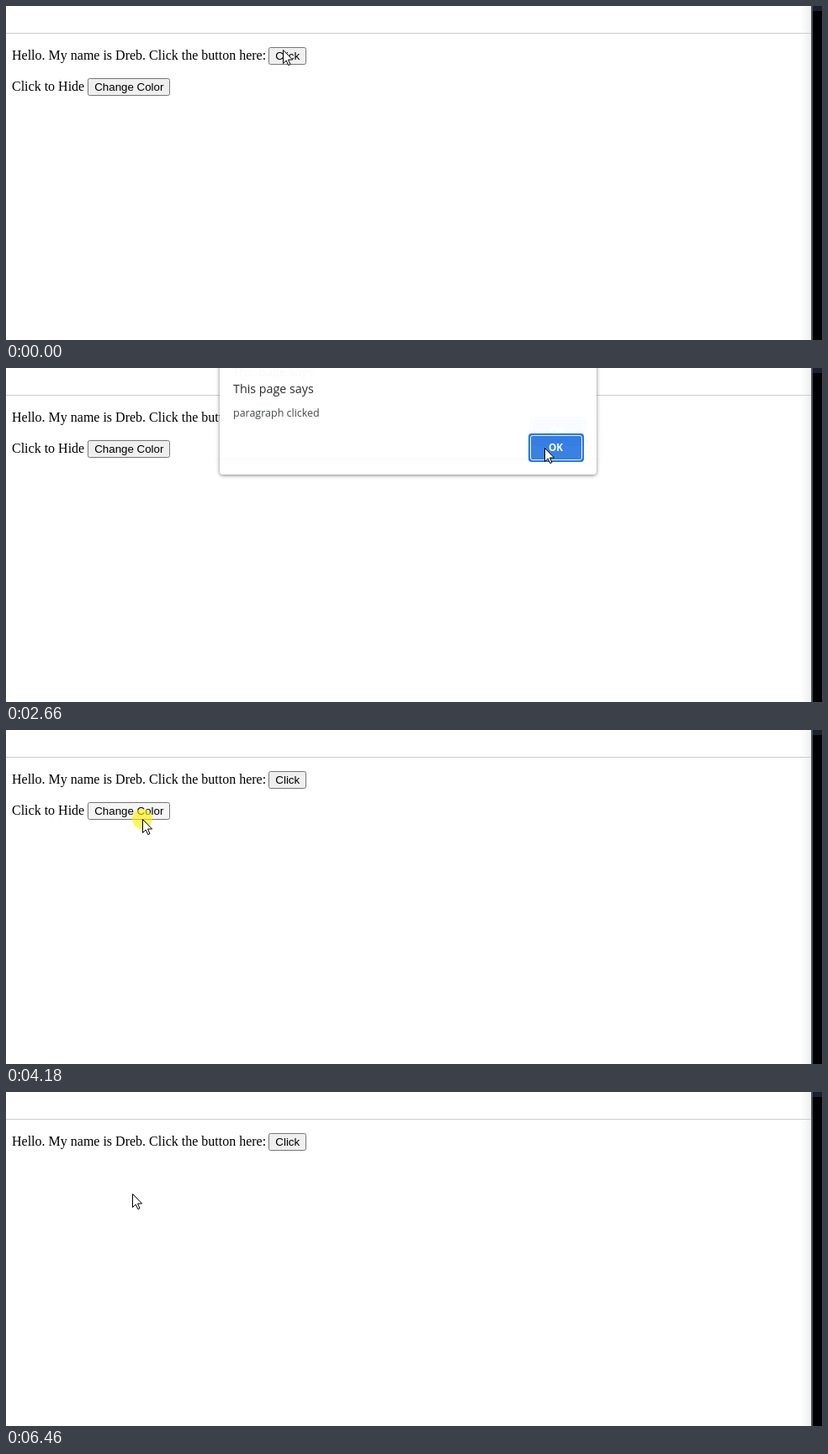
An HTML page for the animation above (6.53 s loop, 970x398 px).

```html
<!DOCTYPE html>
<html lang="en">
<head>
<meta charset="utf-8">
<title>Button clicks</title>
<style>
  html, body { margin: 0; width: 100%; height: 100%; overflow: hidden; background: #fff; }
  svg, .dialog { position: absolute; left: 0; top: 0; }
  .page { font: 16px "Liberation Serif", serif; }
  .button text { font: 13.333px "Liberation Sans", sans-serif; }
  .button rect { fill: #efefef; stroke: #767676; }
  .dialog {
    left: 254px; top: -40px; width: 448px; height: 167px;
    background: #fff; border-radius: 4px;
    box-shadow: 0 1px 4px rgba(0, 0, 0, .5);
    transform-origin: 50% 40px;
    font-family: "Open Sans", sans-serif;
  }
  .title { font-size: 14.3px; fill: #202124; }
  .message { font-size: 12.5px; fill: #3c4043; }
  .ok { font-size: 11.7px; font-weight: 700; fill: #fff; text-anchor: middle; }
</style>
</head>
<body>
<svg class="page" width="970" height="398">
  <defs>
    <linearGradient id="edge">
      <stop offset="0" stop-color="#fff"/>
      <stop offset="1" stop-color="#efeff0"/>
    </linearGradient>
  </defs>
  <rect x="944" width="13" height="398" fill="url(#edge)"/>
  <rect y="32" width="957" height="1" fill="#ccc"/>
  <rect x="957" width="2" height="398" fill="#4b5563"/>
  <rect x="959" width="11" height="398"/>
  <rect x="959" width="11" height="6" fill="#1b2030"/>
  <text x="7" y="64">Hello. My name is Dreb. Click the button here:</text>
  <g class="button">
    <rect id="clickFace" x="312.5" y="49.5" width="44" height="20" rx="2"/>
    <text x="320.3" y="64">Click</text>
  </g>
  <g id="paragraph">
    <rect id="bar" x="7" y="86" width="942" height="21"/>
    <text x="7" y="101">Click to Hide</text>
    <g class="button">
      <rect id="colorFace" x="97.5" y="86.5" width="97" height="20" rx="2"/>
      <text x="105.2" y="101">Change Color</text>
    </g>
  </g>
</svg>
<div id="dialogs"></div>
<svg width="970" height="398">
  <g id="pointer">
    <circle id="halo" r="12" fill="#ffee00" fill-opacity=".6"/>
    <path d="M.5 .5V16.5L4.2 13L6.8 18.6L9 17.6L6.5 12H11.6Z" fill="#fff" stroke="#000"/>
  </g>
</svg>
<script>
const LOOP = 6530, FADE = 280;
const el = id => document.getElementById(id);
const ramp = (t, from, to) => Math.min(1, Math.max(0, (t - from) / (to - from)));
const between = (t, from, to) => t >= from && t < to;

// Pointer tip: time, x, y
const path = [
  [0, 329, 52], [69, 329, 52], [70, 330, 54], [550, 330, 54], [860, 394, 87],
  [1150, 394, 87], [1560, 717, 99], [1630, 707, 98], [1790, 640, 95],
  [3640, 640, 95], [4040, 162, 106], [4860, 162, 106], [5130, 98, 106],
  [5190, 98, 106], [5320, 62, 91], [6060, 62, 91], [6450, 150, 121], [LOOP, 150, 121]
];
const presses = [[270, 410], [890, 1020], [1840, 1910], [2590, 2660],
  [3420, 3490], [4110, 4310], [4710, 4840], [5850, 5990]];

const dialogs = [
  { message: "button clicked", opens: 410, closes: 1910 },
  { message: "paragraph clicked", opens: 1910, closes: 2660 },
  { message: "section clicked", opens: 2660, closes: 3490 }
];
for (const dialog of dialogs) {
  const box = dialog.box = document.createElement("div");
  box.className = "dialog";
  box.innerHTML = `<svg width="448" height="167">
    <text class="title" x="16" y="70">This page says</text>
    <text class="message" x="16" y="98">${dialog.message}</text>
    <rect class="face" x="367" y="118" width="66" height="34" rx="4"/>
    <rect class="face" x="369.5" y="120.5" width="61" height="29" rx="2.5" stroke="#fff"/>
    <text class="ok" x="399.5" y="139">OK</text></svg>`;
  dialog.faces = box.querySelectorAll(".face");
  el("dialogs").append(box);
}

function pointerAt(t) {
  const i = path.findIndex(key => key[0] > t);
  const [t0, x0, y0] = path[i - 1], [t1, x1, y1] = path[i];
  const p = ramp(t, t0, t1), eased = p * p * (3 - 2 * p);
  return [x0 + (x1 - x0) * eased, y0 + (y1 - y0) * eased];
}

function drawDialog({ box, faces, opens, closes }, t, hovered) {
  const shown = ramp(t, opens, opens + FADE) * (1 - ramp(t, closes, closes + FADE));
  const hidden = 1 - shown;
  box.style.opacity = shown ** .6;
  box.style.transform = hidden
    ? `perspective(1000px) translateY(${-20 * hidden}px) rotateX(${8 * hidden}deg)` : "none";
  faces[0].style.fill = "#1a73e8";
  faces[1].style.fill = hovered ? "#317ce2" : "#1a73e8";
}

function draw(t) {
  const [x, y] = pointerAt(t);
  const pressed = presses.some(([from, to]) => between(t, from, to));
  const faceColor = hovered => !hovered ? "#efefef" : pressed ? "#f5f5f5" : "#e5e5e5";

  el("pointer").setAttribute("transform", `translate(${Math.round(x)} ${Math.round(y)})`);
  el("halo").style.display = pressed ? "" : "none";
  el("clickFace").style.fill = faceColor(between(t, 70, 410));
  el("colorFace").style.fill = faceColor(between(t, 4040, 5250));
  el("bar").style.fill = t < 4310 ? "none" : t < 4840 ? "#5b8f7d" : "#3a0a30";
  el("paragraph").style.opacity = 1 - ramp(t, 5990, 6400);

  const overOk = between(x, 621, 687) && between(y, 78, 112);
  for (const dialog of dialogs) drawDialog(dialog, t, overOk);
}

function tick() {
  draw(performance.now() % LOOP);
  requestAnimationFrame(tick);
}
tick();
</script>
</body>
</html>
```
